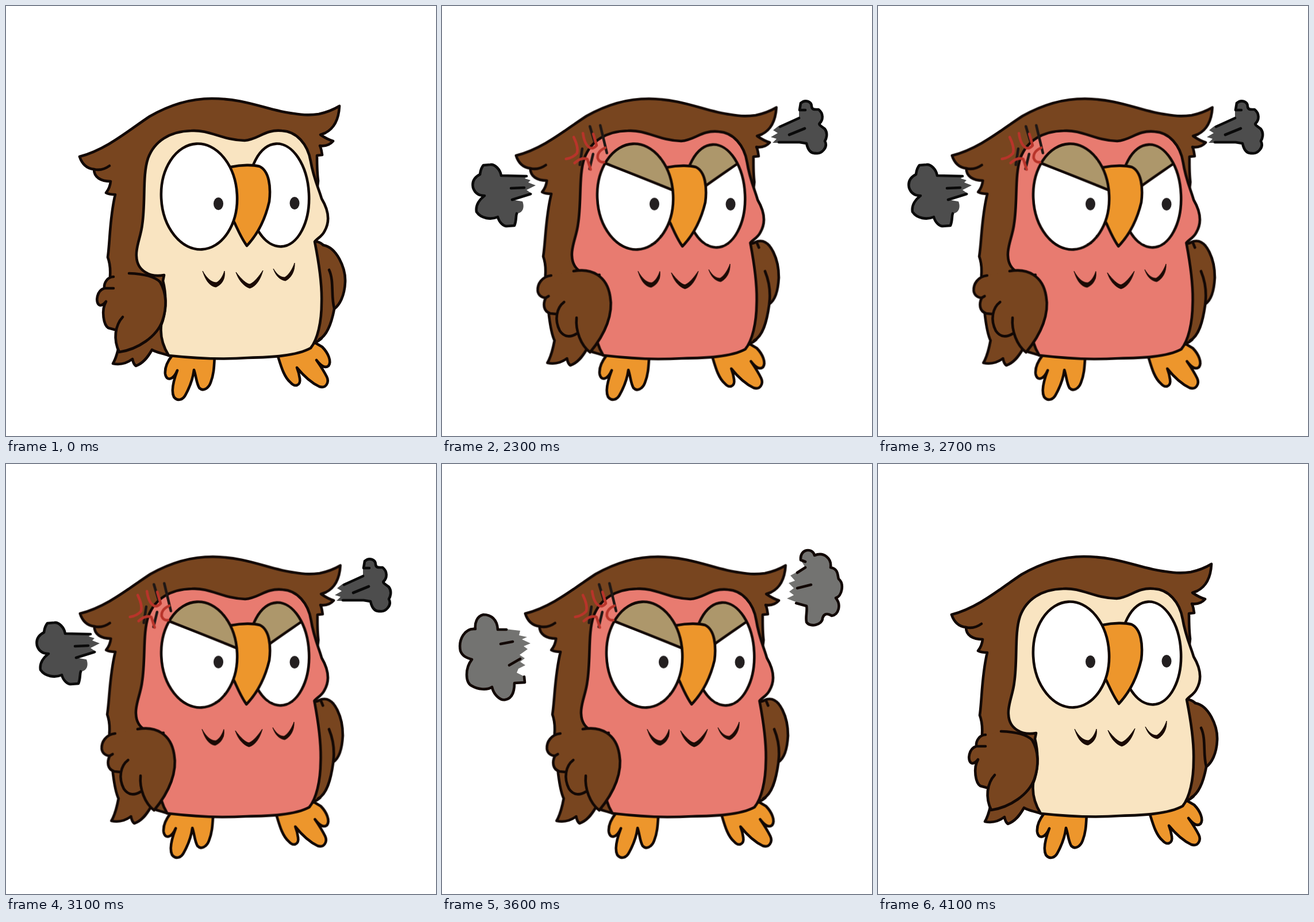
An HTML page for the animation above (4.2 s loop, 748 px wide and 748 px high).

```html
<!DOCTYPE html>
<html lang="en">
<head>
<meta charset="utf-8">
<title>Angry owl</title>
<style>
html, body { margin: 0; width: 100%; height: 100%; overflow: hidden; background: #fff; }
svg { display: block; width: 100vw; height: 100vh; }

.ink { stroke: #120805; stroke-width: 4.6; stroke-linejoin: round; stroke-linecap: round; }
.line { fill: none; }
.brown { fill: #78451f; }
.orange { fill: #ed962c; }
.white { fill: #fff; }
.dark { fill: #231f20; }
.mark { fill: #1a0a05; stroke: #1a0a05; stroke-width: 1; }
.lid { fill: #ad976b; }
.smoke .line { stroke: #0a0a0a; }
.dense { fill: #4d4d4d; }
.loose { fill: #737371; }
.faint { fill: #9c9c9a; }
.vein { fill: none; stroke-width: 4.6; stroke-linecap: round; stroke-linejoin: round; }

/* One step lasts 100 ms = 2.381% of the loop. */
.owl, .face, .calm, .angry, .lid, .vein, .smoke { animation: 4200ms step-end infinite; }
.owl { animation-name: shake; }
.face { animation-name: blush; }
.calm { animation-name: calm; }
.angry { animation-name: angry; }
.lid.left { animation-name: lid-left; }
.lid.right { animation-name: lid-right; }
.vein { animation-name: rage; }
.dense { animation-name: puff1; }
.loose { animation-name: puff2; }
.faint { animation-name: puff3; }

.owl { transform-origin: 369px 344px; }
@keyframes shake {
  0%, 90.476% { transform: none; }
  54.762%, 59.524%, 64.286%, 69.048%, 73.81%, 78.571%, 83.333%, 88.095% { transform: translateY(.5px) rotate(.55deg); }
  57.143%, 61.905%, 66.667%, 71.429%, 76.19%, 80.952%, 85.714% { transform: translate(16px, .5px) rotate(.55deg); }
}
@keyframes blush {
  0%, 97.619% { fill: #f9e4c1; }
  47.619%, 95.238% { fill: #fac8b0; }
  50%, 92.857% { fill: #f4ae9b; }
  52.381%, 90.476% { fill: #ee9485; }
  54.762% { fill: #e87b70; }
}
@keyframes calm {
  0%, 97.619% { visibility: visible; }
  47.619% { visibility: hidden; }
}
@keyframes angry {
  0%, 97.619% { visibility: hidden; }
  47.619% { visibility: visible; }
}
@keyframes rage {
  0%, 90.476% { visibility: hidden; }
  54.762% { visibility: visible; }
}
@keyframes lid-left {
  0%, 97.619% { visibility: hidden; }
  47.619%, 95.238% { visibility: visible; d: path("M200 200L300 247C325 247 350 253 382 269L420 200Z"); }
  50%, 92.857% { visibility: visible; d: path("M200 200L292 255C320 259 350 268 390 286L420 200Z"); }
  52.381%, 90.476% { visibility: visible; d: path("M200 200L284 263C315 272 350 284 397 304L420 200Z"); }
  54.762% { visibility: visible; d: path("M200 200L276 271C310 284 350 299 405 321L420 200Z"); }
}
@keyframes lid-right {
  0%, 97.619% { visibility: hidden; }
  47.619%, 95.238% { visibility: visible; d: path("M400 200L410 294L426 279C445 258 470 246 500 252L560 200Z"); }
  50%, 92.857% { visibility: visible; d: path("M400 200L410 314L436 291C455 272 480 258 508 256L560 200Z"); }
  52.381%, 90.476% { visibility: visible; d: path("M400 200L410 330L445 302C465 285 490 270 517 260L560 200Z"); }
  54.762% { visibility: visible; d: path("M400 200L410 347L455 314C475 299 500 282 525 264L560 200Z"); }
}
@keyframes puff1 {
  0%, 57.143%, 66.667%, 76.19%, 85.714% { visibility: hidden; }
  54.762%, 64.286%, 73.81%, 83.333% { visibility: visible; }
}
@keyframes puff2 {
  0%, 59.524%, 69.048%, 78.571%, 88.095% { visibility: hidden; }
  57.143%, 66.667%, 76.19%, 85.714% { visibility: visible; }
}
@keyframes puff3 {
  0%, 61.905%, 71.429%, 80.952%, 90.476% { visibility: hidden; }
  59.524%, 69.048%, 78.571%, 88.095% { visibility: visible; }
}
</style>
</head>
<body>
<svg viewBox="0 0 748 748">
  <defs>
    <ellipse id="eyeL" cx="336" cy="331.500" rx="66" ry="92" transform="rotate(-3 336 331.500)"/>
    <ellipse id="eyeR" cx="474.500" cy="329" rx="52.500" ry="89.500" transform="rotate(-3 474.500 329)"/>
    <clipPath id="clipL"><use href="#eyeL"/></clipPath>
    <clipPath id="clipR"><use href="#eyeR"/></clipPath>
    <g id="cloudL">
      <path d="M110 287L97 288C96 270 85 262 72 262C60 265 57 277 58 287C40 285 28 305 32 325C36 336 46 338 52 340C40 355 40 380 52 386C62 392 78 394 87 388C90 402 102 412 110 410C122 408 126 396 126 381L144 380L142 369L130 363L133 356L145 350L136 344L144 338L135 332L149 322L142 317L154 312L139 305L148 301L134 298L136 290Z"/>
      <path class="ink line" d="M112 288L97 288C96 270 85 262 72 262C60 265 57 277 58 287C40 285 28 305 32 325C36 336 46 338 52 340C40 355 40 380 52 386C62 392 78 394 87 388C90 402 102 412 110 410C122 408 126 396 126 381L144 380L143 370M102 313L123 309M117 350L136 339"/>
    </g>
    <g id="cloudR">
      <path d="M624 167C622 147 645 145 648 159C665 152 678 165 676 180C690 182 688 195 690 200C700 208 696 230 685 233C695 245 690 262 678 264C668 258 664 262 662 268C662 280 640 285 634 275C632 265 636 255 634 247L600 234L612 228L604 222L612 216L603 207L614 203L606 194L632 180Z"/>
      <path class="ink line" d="M632 170L624 167C622 147 645 145 648 159C665 152 678 165 676 180C690 182 688 195 690 200C700 208 696 230 685 233C695 245 690 262 678 264C668 258 664 262 662 268C662 280 640 285 634 275C632 265 636 255 634 247L616 242M618 189L632 180M618 216L642 210"/>
    </g>
  </defs>

  <g class="owl">
    <g class="ink orange">
      <path d="M289 608C281 618 276 630 277 640C279 653 291 651 298 634C292 650 287 670 292 680C298 688 308 686 313 675C320 662 325 649 327 633C331 645 331 655 336 664C342 671 352 666 356 655C362 640 362 625 363 608Z"/>
      <path d="M472 606C478 625 483 645 495 655C503 664 513 660 511 648C510 640 508 634 506 629C515 640 530 655 545 662C556 666 563 655 558 645C553 635 547 626 540 616C548 626 555 631 561 626C567 618 560 603 550 593L538 586Z"/>
    </g>

    <g class="ink brown">
      <g class="calm">
        <path d="M535 410C541 409 547 411 552 416C575 420 591 455 590 480C589 505 580 520 571 527C567 548 560 572 545 580L549 578C540 586 536 586 530 586Z"/>
        <path class="line" d="M562 459C571 478 565 505 571 526"/>
      </g>
      <g class="angry">
        <path d="M535 412C542 412 546 408 550 407C573 402 587 440 587 470C586 495 580 510 571 516C567 548 560 572 545 580L549 578C540 586 536 586 530 586Z"/>
        <path class="line" d="M563 459C571 478 573 498 571 515M549 411L552 418"/>
      </g>

      <path d="M128 262C175 250 215 215 250 192C290 169 325 161 358 161C420 161 455 182 500 187C520 190 530 190 544 188C558 185 570 180 580 174C579 195 573 212 555 221L547 224C556 230 562 233 569 235C562 243 553 244 546 243C549 249 549 255 550 259L541 260C541 275 541 290 543 304L530 420V590L283 608C272 604 262 603 254 598C246 612 238 622 226 626C223 624 221 620 220 614C212 620 200 625 186 622C192 612 195 600 198 583C194 575 190 555 188 540L181 470C182 455 180 445 177 437C181 410 180 370 190 328C184 328 180 328 174 325C178 320 181 315 182 305C165 305 153 298 153 284C143 283 133 277 128 262Z"/>
      <path class="line" d="M153 284C165 287 173 283 180 278"/>
    </g>

    <path class="ink face" d="M283 608C272 590 268 572 270 555C278 535 280 505 273 478L275 468C250 473 228 460 227 436C225 420 235 400 237 380C243 340 237 295 247 265C258 235 285 218 322 217C355 215 375 233 415 234C440 232 450 214 480 217C505 218 525 240 530 270C535 300 545 320 549 335C561 355 564 375 554 392C549 402 541 404 537 410C543 440 550 480 549 515C549 550 542 580 530 595C505 609 460 611 420 612C380 615 330 613 283 608Z"/>

    <use href="#eyeR" class="white"/>
    <g clip-path="url(#clipR)"><path class="ink lid right" d="M400 200L410 294L426 279C445 258 470 246 500 252L560 200Z"/></g>
    <use href="#eyeR" class="ink line"/>
    <path class="ink orange" d="M391 280C410 276 430 276 441 279C458 287 461 315 458 340C450 375 435 400 419 417C410 405 405 393 398 378L370 330Z"/>
    <use href="#eyeL" class="white"/>
    <g clip-path="url(#clipL)"><path class="ink lid left" d="M200 200L300 247C325 247 350 253 382 269L420 200Z"/></g>
    <use href="#eyeL" class="ink line"/>
    <g class="dark">
      <ellipse cx="369.500" cy="344" rx="8.500" ry="11"/>
      <ellipse cx="502" cy="343" rx="8.500" ry="11"/>
    </g>

    <g class="mark">
      <path d="M342 461C350 475 358 481 366 481C373 478 378 468 380 461C382 475 375 485 365 489C352 487 346 473 342 461Z"/>
      <path d="M400 463C410 476 418 483 424 484C433 480 440 470 447 460C443 475 435 488 424 491C412 487 404 475 400 463Z"/>
      <path d="M465 457C472 468 478 472 485 472C493 467 499 456 502 447C503 462 495 474 486 478C475 476 469 468 465 457Z"/>
    </g>

    <g class="calm">
      <path class="brown" d="M187 471C178 471 170 480 171 491C158 495 155 515 162 520C166 522 170 519 174 514C165 530 170 555 178 560L189 563C188 578 189 590 197 602C230 597 262 575 272 548C280 525 280 500 268 480C258 470 240 466 214 465Z"/>
      <path class="ink line" d="M187 471C178 471 170 480 171 491L187 491M171 491C158 495 155 515 162 520C166 522 170 519 174 514C165 530 170 555 178 560L189 563M203 541C190 555 186 580 197 602C230 597 262 575 272 548C280 525 280 500 268 480C258 470 240 466 214 465"/>
    </g>
    <g class="angry">
      <path class="brown" d="M191 470C175 472 167 485 168 497C169 505 176 509 182 509C177 520 178 532 190 536L201 537C201 550 205 562 209 569C217 578 227 577 236 571C242 585 250 596 260 603C287 570 300 535 294 505C288 470 262 456 230 462Z"/>
      <path class="ink line" d="M191 470C175 472 167 485 168 497C169 505 176 509 182 509C177 520 178 532 190 536L201 537M182 509L187 506M214 516C201 526 197 547 207 566C215 578 227 577 236 571M236 543C234 566 244 591 260 603C287 570 300 535 294 505C288 470 262 456 230 462"/>
    </g>

    <path class="vein" stroke="#1e1715" d="M256 210L264 236M274 208L286 256M243 249L239 277M262 258L256 284"/>
    <path class="vein" stroke="#b8342a" d="M228 229Q237 247 234 257Q227 265 215 267M244 222Q247 242 256 247M262 223L268 243Q262 250 256 247M230 274Q242 263 252 267L258 285M283 247Q269 253 270 265Q273 273 281 272"/>
  </g>

  <g class="smoke dense">
    <path d="M148 296L103 295C101 284 92 275 84 276L72 277C67 283 67 288 66 293C56 298 52 306 54 316C58 328 68 330 74 330C66 336 58 346 60 358C68 370 85 372 97 367C100 378 108 383 112 383L126 382C130 372 128 365 130 361C141 360 144 350 140 340L122 337L157 327L147 320L163 312L150 307L154 303L144 300Z"/>
    <path class="ink line" d="M147 296L103 295C101 284 92 275 84 276L72 277C67 283 67 288 66 293C56 298 52 306 54 316C58 328 68 330 74 330C66 336 58 346 60 358C68 370 85 372 97 367C100 378 108 383 112 383L126 382C130 372 128 365 130 361M120 317L143 316M122 337L154 327"/>
    <path d="M624 169C632 162 643 166 643 175C644 181 648 180 655 180C664 187 663 198 657 204C654 207 662 210 666 214C672 222 668 232 666 235C672 246 660 258 650 256C640 257 636 248 634 239L575 238L582 231L572 228L584 221L576 216L585 209L621 195V181Z"/>
    <path class="ink line" d="M632 181H622L624 169C632 162 643 166 643 175C644 181 648 180 655 180C664 187 663 198 657 204C654 207 662 210 666 214C672 222 668 232 666 235C672 246 660 258 650 256C640 257 636 248 634 239L622 237H586M588 210L621 195M604 224L631 213"/>
  </g>
  <g class="smoke loose">
    <use href="#cloudL"/>
    <use href="#cloudR"/>
  </g>
  <g class="smoke faint">
    <use href="#cloudL" x="-21" y="-10"/>
    <use href="#cloudR" x="20" y="-20"/>
  </g>
</svg>
</body>
</html>
```
